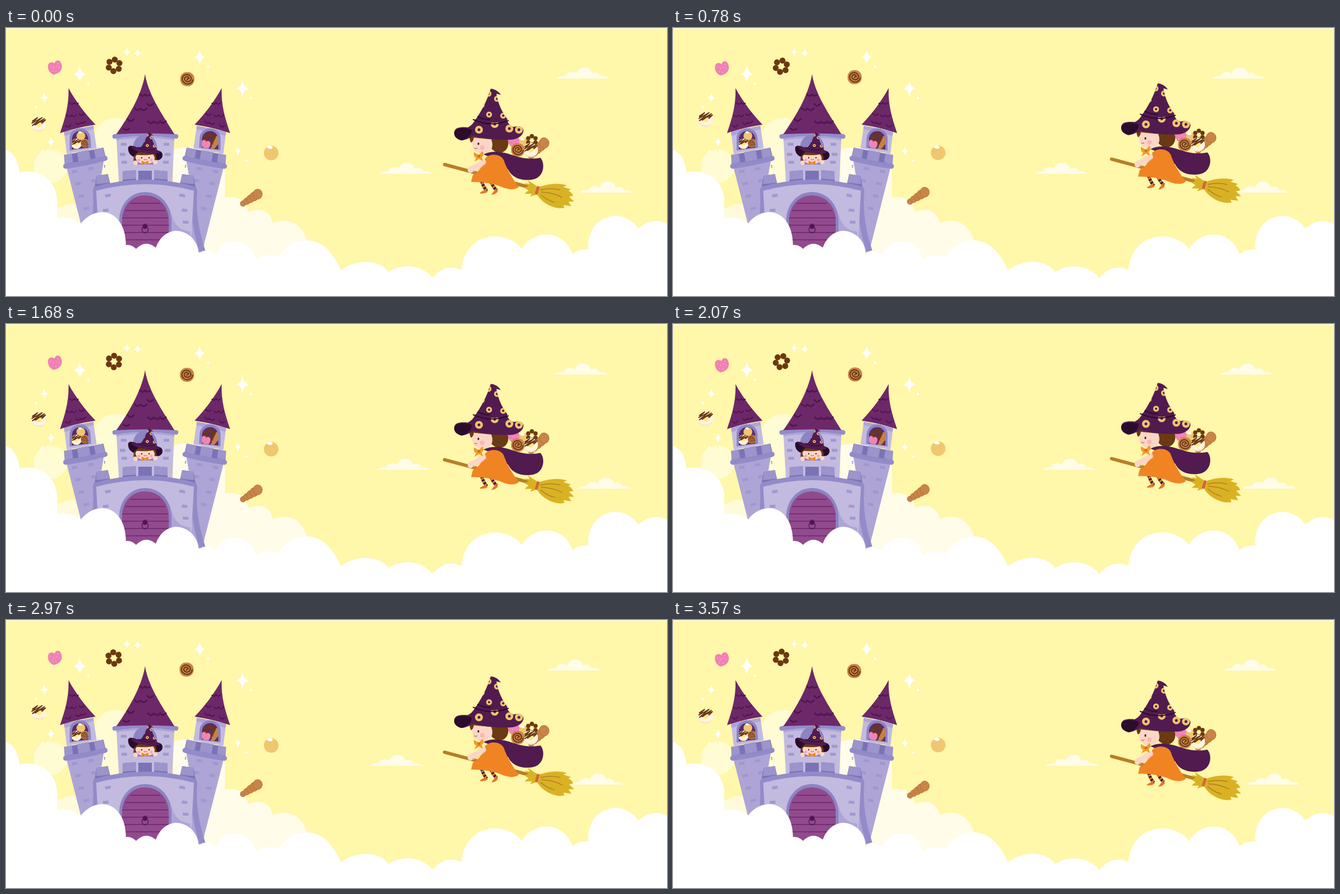
Recreate the animation shown at these times as an HTML page. Size 1174 by 477 pixels, loop 3600 ms.

```html
<!DOCTYPE html>
<html lang="en">
<head>
<meta charset="utf-8">
<title>Witch and castle</title>
<style>
html, body { margin: 0; width: 100%; height: 100%; overflow: hidden; background: #fff7a9; }
svg { display: block; width: 1174px; height: 477px; }
.line { fill: none; stroke-linecap: round; stroke-linejoin: round; }
.bricks { fill: none; stroke: #9f97ce; stroke-width: 5; stroke-dasharray: 10 19; }
</style>
</head>
<body>
<svg viewBox="0 0 1174 477">
<defs>
  <path id="spark" fill="#fff" d="M0-1Q.13-.13 .78 0Q.13.13 0 1Q-.13.13-.78 0Q-.13-.13 0-1Z"/>
  <path id="cloud" fill="#fffce9" d="M0 20C5 16 12 14 16 16C18 8 30 6 36 11C40-4 62-3 64 11C71 7 78 11 79 16C86 14 92 17 95 20Z"/>
  <g id="heart">
    <path fill="#f080b4" d="M-2 13C-10 11-14 2-12-5C-10-10-4-10-1-7C1-14 9-14 11-7C14 0 12 10-2 13Z"/>
    <path class="line" stroke="#f8b4d3" stroke-width="1.3" d="M-8-3l1 1M-3 1l1-1M5-7l1 1M7 1l1-1M1 7l1 1M-5 7l1-1M2-2l1 0"/>
  </g>
  <g id="swirl">
    <rect x="-12.5" y="-12.5" width="25" height="25" rx="11.5" fill="#c98448"/>
    <path class="line" stroke="#683511" stroke-width="2" d="M0 1A2 2 0 0 1 3-1A4 4 0 1 0-3 3A6 6 0 0 0 7-1A8 8 0 1 0-6 6A9.5 9.5 0 0 0 10 1"/>
  </g>
  <g id="ring" fill="#6b3811"></g>
  <g id="donut">
    <circle r="13.5" fill="#fff4de"/>
    <path fill="#f7e5c5" d="M-12 6A13.5 13.5 0 0 0 12 6Q0 15-12 6Z"/>
    <circle r="4.8" fill="#fbea86"/>
    <path class="line" stroke="#6b3811" stroke-width="2" d="M-11-6L-2-12L-12-2L6-12L-11 2L10-10L-6 1M4-4L12-8L6-2"/>
  </g>
  <g id="ball">
    <circle r="13" fill="#efc76f"/>
    <path fill="#fff" d="M-8-10Q-5-15-1-13Q4-12 2-8Q-4-6-8-10Z"/>
  </g>
  <g id="twist" fill="#c98448" stroke="#ad6a35" stroke-width=".8"></g>
  <path id="cone" d="M834 163C844 149 854 130 861 108Q872 109 879 119L871 117C874 136 882 151 891 163Q863 174 834 163Z"/>
  <path id="brim" d="M796 186C797 176 809 176 820 177Q829 173 834 162H889Q893 175 902 176C912 173 920 177 919 184C917 194 905 200 890 199C870 200 845 196 830 192Q817 200 808 200Q796 196 796 186Z"/>
  <clipPath id="hatClip"><use href="#cone"/><use href="#brim"/></clipPath>
  <path id="coneDots" class="line" d="M857 117h0M872 126h0M845 137h0M858 154h0M883 156h0"/>
  <path id="brimDots" class="line" d="M840 181h0M868 171h0M894 179h0M911 181h0"/>
  <g id="coneHat">
    <use href="#cone" fill="#521b50"/>
    <g clip-path="url(#hatClip)">
      <use href="#coneDots" stroke="#efc56b" stroke-width="10.5"/><use href="#coneDots" stroke="#521b50" stroke-width="4"/>
    </g>
    <path class="line" stroke="#2b0c2c" stroke-width="2" d="M830 163Q860 177 892 165M838 158Q851 164 860 163"/>
  </g>
  <clipPath id="windowClip"><path d="M117 216V198A14.5 14.5 0 0 1 146 198V213Z"/></clipPath>
  <g id="side">
    <path fill="#aea5d6" d="M107 246L174 234L163 300L192 400H146Z"/>
    <path class="bricks" d="M117 256L176 246M123 278L165 270M129 300L165 293M138 322L175 314"/>
    <path fill="#c3badf" d="M103 184L155 174L161 214L108 224Z"/>
    <path fill="#aea5d6" d="M103 184L155 174L156 180Q130 186 104 192Z"/>
    <path fill="#7a73b6" d="M104 226L173 213L177 230L105 243Z"/>
    <path fill="#9c94cb" d="M103 226L117 223L119 239L104 242ZM126 221L147 217L150 234L129 238ZM156 216L172 213L176 229L159 232Z"/>
    <path class="line" stroke="#938bc8" stroke-width="9" d="M106 246Q140 242 176 232"/>
    <path fill="#6d2869" d="M111 107C124 131 141 153 159 172Q126 177 96 187C105 160 112 138 111 107Z"/>
    <path class="line" stroke="#511650" stroke-width="2.2" d="M113 133q4 5 8 0q3 4 7 1M108 155q4 6 9 0q3 5 8 0M130 153q4 5 9-1M106 174q5 5 9-2M124 169q4 5 9-1q3 4 8-2"/>
    <path fill="#8c84c3" d="M113 218V199A18 18 0 0 1 150 195L151 213Z"/>
    <path fill="#5d2b68" d="M117 216V198A14.5 14.5 0 0 1 146 198V213Z"/>
    <path fill="#938bc8" d="M154 288L164 288Q169 345 150 398L140 396Q159 340 154 288Z"/>
  </g>
  <g id="wall">
    <path class="bricks" d="M204 207H222M202 225H216M205 239H217M176 299L204 294M172 325L200 322M170 346L198 344"/>
    <path fill="#7a73b6" d="M207 255L231 253V273L207 275ZM161 263L181 260L186 281L157 286ZM235 254H247V271H235Z"/>
    <path fill="#9c94cb" d="M207 255L231 253V268L207 270ZM161 263L181 260L184 275L160 278Z"/>
  </g>
</defs>

<rect width="1174" height="477" fill="#fff7a9"/>
<rect width="1174" height="1" fill="#fffef2"/>

<g id="skyClouds">
  <use href="#cloud" x="977.5" y="70"/><use href="#cloud" x="662" y="239.5"/><use href="#cloud" x="1018.5" y="273"/>
</g>

<path fill="#fffbd2" d="M156 290V199A39 39 0 0 1 234 199V290Z"/>
<circle cx="79" cy="246" r="30" fill="#fffbd2"/>
<path fill="#fffce9" d="M297 420V217Q330 205 360 222C378 226 389 245 389 262V302Q422 295 430 327Q466 315 474 347Q519 331 536 380V430H297Z"/>
<path fill="#fffadb" d="M85 420V330Q100 308 130 315H200V420Z"/>
<path fill="#fff" d="M366 420Q375 380 407 380Q438 382 443 411Q466 399 486 408V425Z"/>
<g id="sparks"></g>

<use href="#side"/>
<use href="#side" transform="matrix(-1 0 0 1 494 0)"/>
<g clip-path="url(#windowClip)">
  <use href="#ball" transform="translate(133 192)scale(.6)"/><use href="#donut" transform="translate(125 206)scale(.68)"/><use href="#swirl" transform="translate(140 205)scale(.6)"/>
</g>
<g transform="matrix(-1 0 0 1 494 0)" clip-path="url(#windowClip)">
  <use href="#ring" transform="translate(132 197)scale(.7)"/><use href="#heart" transform="translate(139 207)scale(.65)"/><use href="#twist" transform="translate(121 204)scale(-.65 .65)rotate(-25)"/>
</g>
<path fill="#c3badf" d="M196 194H299L295 282H201Z"/>
<path fill="#aea5d6" d="M196 194Q247 185 299 194V200Q247 191 196 200Z"/>
<path class="line" stroke="#938bc8" stroke-width="8" d="M193 193Q247 183 302 193"/>
<path fill="#6d2869" d="M247 82C241 120 216 160 196 189Q247 186 299 189C278 154 253 120 247 82Z"/>
<path class="line" stroke="#511650" stroke-width="3" d="M238 118q4 6 9 0q4 5 8 1M251 135q5 7 10 0M229 143q5 6 10 0q5 7 11 0M216 162q5 7 11 0M252 166q5 7 11 0q5 7 11 0q5 6 10 0M209 179q5 5 10 0"/>
<path fill="#c3badf" d="M160 284Q247 264 334 284L328 400H166Z"/>
<path fill="#aea5d6" d="M294 330Q300 360 327 362L328 400H290Z"/>
<use href="#wall"/>
<use href="#wall" transform="matrix(-1 0 0 1 494 0)"/>
<path class="line" stroke="#938bc8" stroke-width="8" d="M159 286Q247 262 335 286"/>
<path fill="#8c84c3" d="M201 400V342C202 312 222 292 247 292S293 312 294 342V400Z"/>
<path fill="#924a8e" d="M206 400V342C207 315 224 298 247 298S288 315 289 342V400Z"/>
<path class="line" stroke="#6d2869" stroke-width="1.3" d="M221 312H273M212 325H282M207 338H288M206 351H289M206 364H289M206 377H289"/>
<circle cx="247" cy="353" r="4.5" fill="#511650"/><circle cx="247" cy="359" r="5.5" fill="none" stroke="#511650" stroke-width="1.4"/>

<path fill="#8c84c3" d="M226 243V211A21 21 0 0 1 268 211V243Z"/>
<path fill="#2b0c2c" d="M217 213C219 206 229 211 234 213H264Q268 218 273 219C281 222 279 234 270 235C261 235 258 225 247 225Q236 225 226 229Q216 224 217 213Z"/>
<path fill="#6b3a12" d="M227 236Q226 226 235 221H261Q269 226 267 236Z"/>
<path fill="#fbd6c7" d="M230 231Q230 225 236 226Q249 227 261 225Q266 230 263 236Q258 242 247 242Q232 241 230 231Z"/>
<path fill="#521b50" d="M221 211Q230 213 236 212H262Q266 217 274 220Q268 227 247 222Q232 223 221 211Z"/>
<use href="#coneHat" transform="translate(-178 132)scale(.5)"/>
<g fill="#fbd6c7"><circle cx="230" cy="240" r="4"/><circle cx="265" cy="239" r="4"/></g>
<g fill="#f7a7a3"><circle cx="236" cy="235" r="2.4"/><circle cx="258" cy="235" r="2.4"/></g>
<g fill="#47200e"><circle cx="241" cy="231" r="1.2"/><circle cx="254" cy="231" r="1.2"/></g>
<path class="line" stroke="#a54a38" d="M245 234q2 2 5 0"/>
<path fill="#f08423" d="M247 239L241 236V244L247 241L253 244V236Z"/>

<g id="treats">
  <use href="#heart"/><use href="#ring"/><use href="#swirl"/><use href="#donut"/><use href="#ball"/><use href="#twist"/>
</g>

<g id="witch">
  <path class="line" stroke="#b77f27" stroke-width="6" d="M779 243L928 283"/>
  <path fill="#d9b224" d="M921 276L930 278L927 271L939 279L946 283C964 277 981 275 996 280L990 283L1003 287L999 290Q1006 293 1007 299L1000 300L1009 309L999 309L1004 317L990 315L992 320C975 324 952 312 943 296L931 300L934 295L921 295L928 289L920 284L928 282Z"/>
  <path class="line" stroke="#b77f27" stroke-width="1.6" d="M950 288Q967 284 984 288M951 292Q972 293 987 301M950 297Q962 307 974 310"/>
  <path class="line" stroke="#d4653b" stroke-width="5" d="M945 284L942 294"/>
  <use href="#ball" transform="translate(919 206)scale(.8)"/>
  <use href="#heart" transform="translate(902 202)scale(.8)"/>
  <use href="#ring" transform="translate(934 200)scale(.72)"/>
  <use href="#twist" transform="translate(946 214)rotate(-12)scale(1.05)"/>
  <use href="#donut" transform="translate(932 217)scale(.95)"/>
  <use href="#swirl" transform="translate(909 217)scale(.95)"/>
  <path id="legs" fill="none" stroke="#3d173d" stroke-width="5.5" d="M844 270Q847 282 854 290M860 271Q865 284 872 289"/>
  <use href="#legs" style="stroke:#f08423" visibility="hidden"/>
  <path fill="none" stroke="#f08423" stroke-width="5.5" stroke-dasharray="2.5 3.5" d="M844 270Q847 282 854 290M860 271Q865 284 872 289"/>
  <path fill="#e57725" d="M851 288L856 291Q850 296 841 294Q844 291 851 288ZM869 288L874 290Q871 296 862 297Q864 293 869 288Z"/>
  <path fill="#6b3a12" d="M826 188L890 196C896 208 889 221 878 222Q867 222 860 212Z"/>
  <path fill="#521b50" d="M848 225C870 214 895 225 908 229Q930 235 949 231C958 240 956 264 938 269C916 274 898 266 892 252L860 230Z"/>
  <path fill="#f08423" d="M851 232C857 224 877 222 884 235C889 250 899 268 911 283Q902 290 886 285Q860 273 826 274L829 262Q846 252 851 232Z"/>
  <path fill="#fbd6c7" d="M829 192Q827 203 829 212C831 224 850 225 858 220Q868 212 861 196Z"/>
  <path fill="#6b3a12" d="M824 188Q822 198 826 204Q830 202 831 195Q849 197 861 198L865 191Z"/>
  <ellipse cx="839" cy="206" rx="1.5" ry="2.3" fill="#47200e"/>
  <circle cx="846" cy="213" r="4" fill="#f9b7b0"/>
  <path class="line" stroke="#a54a38" d="M832 214q3 2 5 0"/>
  <path class="line" stroke="#fbd6c7" stroke-width="9" d="M848 238Q839 245 825 251"/>
  <path class="line" stroke="#efb9aa" stroke-width="1.2" d="M853 240Q844 249 830 256"/>
  <circle cx="825" cy="253" r="5" fill="#fbd6c7"/>
  <path fill="#f39a2c" d="M840 226L831 221Q830 230 835 231L832 238L840 233L847 237L845 230Q851 225 846 219Z"/>
  <circle cx="840" cy="228" r="2.5" fill="#d96b1f"/>
  <use href="#brim" fill="#521b50"/>
  <path fill="#2b0c2c" d="M796 187C798 177 814 177 827 181Q828 193 810 200Q796 197 796 187Z"/>
  <g clip-path="url(#hatClip)">
    <use href="#brimDots" stroke="#efc56b" stroke-width="14"/><use href="#brimDots" stroke="#521b50" stroke-width="5"/>
  </g>
  <use href="#coneHat"/>
</g>

<path fill="#fff" d="M0 217Q20 223 24 257C60 249 93 273 91 312V339Q112 333 133 348C147 331 162 327 175 328C200 331 213 357 213 386Q223 385 231 393Q248 376 266 391C274 370 289 360 305 361C328 364 341 382 342 400Q360 392 373 406Q408 398 443 412Q466 403 485 407C495 389 515 378 537 378C563 379 582 402 595 431C622 411 662 411 679 434C705 417 741 422 757 445Q781 417 809 431C814 361 891 358 916 393C939 357 990 358 1006 402Q1018 393 1034 394C1031 329 1099 318 1123 357Q1149 335 1174 349V477H0Z"/>
</svg>
<script>
const $ = id => document.getElementById(id);
const repeat = (id, count, draw) => $(id).innerHTML = Array.from({ length: count }, (_, i) => draw(i)).join('');

repeat('ring', 6, i => {
  const a = i * Math.PI / 3;
  return `<circle cx="${10.3 * Math.sin(a)}" cy="${-10.3 * Math.cos(a)}" r="5.3"/>`;
});
repeat('twist', 5, i => `<ellipse cx="${6.5 * i - 15}" cy="${10 - 4.2 * i}" rx="${5 + .8 * i}" ry="${5 + i}"/>`);

// Each big star brings a small one, placed outward and below.
const star = (x, y, r) => `<use href="#spark" transform="translate(${x} ${y})scale(${r})"/>`;
const stars = [[131, 82, 15], [344, 52, 13], [420, 108, 15], [215, 43, 8], [234, 45, 9], [68, 124, 9], [80, 203, 9], [412, 219, 8]];
$('sparks').innerHTML = stars.map(([x, y, r]) =>
  star(x, y, r) + (y > 50 ? star(x + 15 * Math.sign(x - 100), y + 17, 4) : '')).join('');

const PERIOD = 1800, STEP = 30;
const rise = p => 1 - Math.abs(1 - 2 * p);                           // 0, 1, 0
const sway = p => p < .25 ? 4 * p : p < .75 ? 2 - 4 * p : 4 * p - 4; // 0, 1, 0, -1, 0
const place = (node, x, y, turn = 0) => node.setAttribute('transform', `translate(${x} ${y}) rotate(${turn})`);
const [heart, ring, swirl, donut, ball, twist] = $('treats').children;

$('legs').nextElementSibling.remove();

function frame(now) {
  const p = Math.floor(now / STEP) * STEP % PERIOD / PERIOD;
  const r = rise(p), s = sway(p);
  place($('skyClouds'), -24 * r, 0);
  place($('witch'), 0, -11 * r);
  place(heart, 87, 70 + 5.2 * s);
  place(ring, 192 + s, 66.5 + 1.8 * r, 7 + 20 * s);
  place(swirl, 322 + 2.2 * s, 91 - 4 * r, 6 * s);
  place(donut, 58, 171.5 - 10 * r);
  place(ball, 471, 222.5 - 1.3 * s);
  place(twist, 436, 302.5 - 4 * r);
  requestAnimationFrame(frame);
}
frame(performance.now());
</script>
</body>
</html>
```
